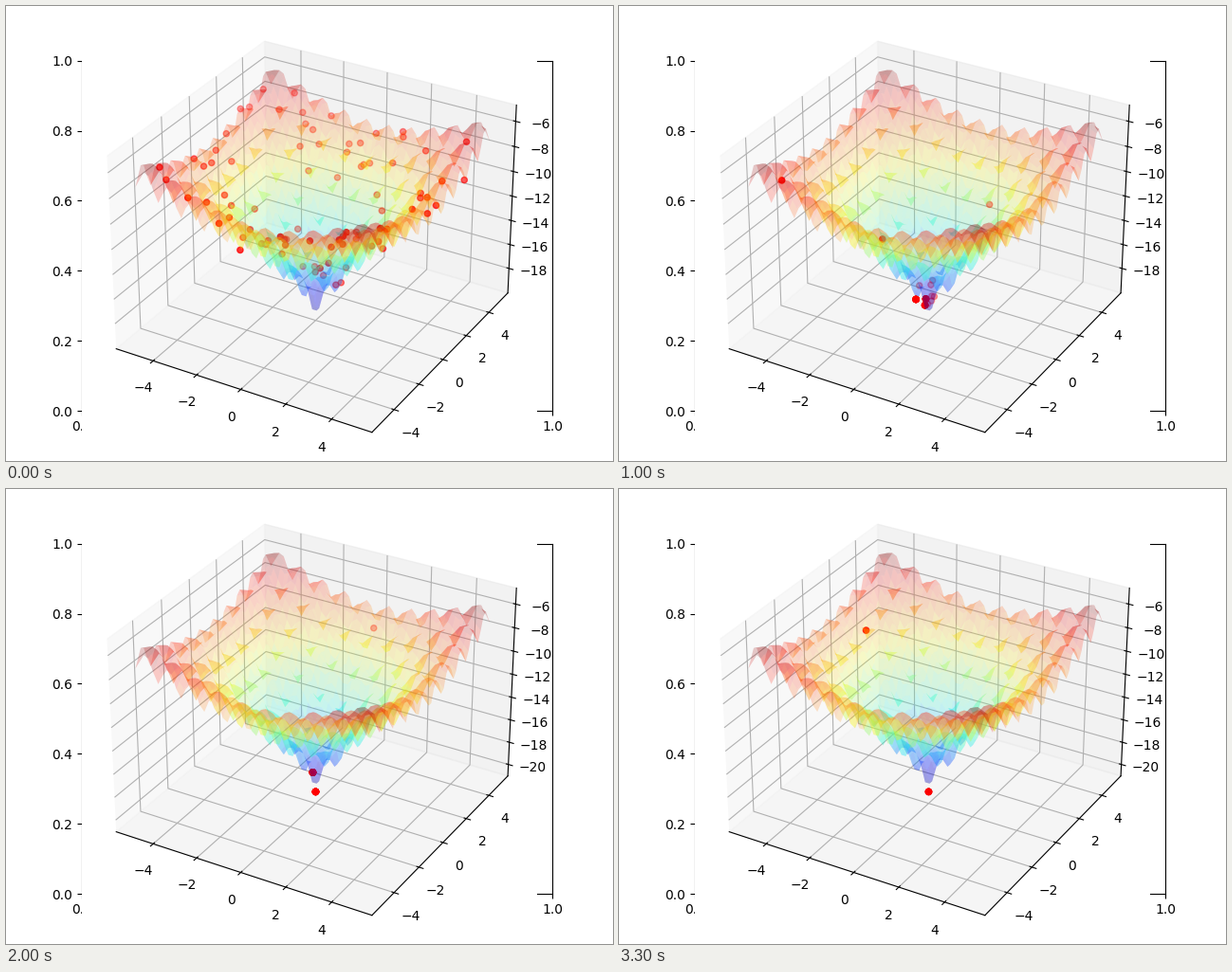
Write a matplotlib script that moves like this. It is 640 by 480 pixels and loops after 3.4 s.

```python
import numpy as np
import matplotlib.pyplot as plt
from matplotlib.animation import FuncAnimation
from mpl_toolkits.mplot3d import Axes3D

FRAMES, STEP = 34, 100
BOUND = 5
SEED = 7

# leading solutions: x, y, first and last generation they live in
LEADERS = [(0, -1, 3, 11), (-0.17, 0, 7, 16), (-0.19, 0.1, 9, 21),
           (0, 0, 17, FRAMES)]
COPIES = 14


def ackley(x, y):
    bowl = -20 * np.exp(-0.2 * np.sqrt(0.5 * (x**2 + y**2)))
    ripple = np.exp(0.5 * (np.cos(2 * np.pi * x) + np.cos(2 * np.pi * y)))
    return bowl - ripple + np.e


def padded(low, high):
    """Data limits with a 5 % margin, and the wider limits of the panes."""
    margin = 0.05 * (high - low)
    low, high = low - margin, high + margin
    pane = (high - low) / 48
    return low, (low - pane, high + pane)


plt.rcParams["font.family"] = "DejaVu Sans"
fig, flat = plt.subplots(figsize=(6.4, 4.8), dpi=100)
ax = Axes3D(fig, rect=[0.125, 0, 0.75, 1])
fig.add_axes(ax)

side = np.linspace(-BOUND, BOUND, 50)
gx, gy = np.meshgrid(side, side)
gz = ackley(gx, gy)
ax.plot_surface(gx, gy, gz, cmap="jet", alpha=0.2)
ax.set_xlim(padded(-BOUND, BOUND)[1])
ax.set_ylim(padded(-BOUND, BOUND)[1])


def population(gen):
    rng = np.random.default_rng([SEED, gen])

    # scattered individuals die out until a single mutant is left
    wild = rng.uniform(-BOUND, BOUND, (1 + int(84 * np.exp(-gen / 2.7)), 2))

    # the fitter half of a cloud that tightens around the centre
    size = int(26 * np.exp(-((gen - 6) / 3.5)**2))
    cloud = rng.normal(0, 1.6 * np.exp(-gen / 8), (3 * size, 2))
    cloud = cloud[ackley(*cloud.T) > gz.min()]
    cloud = cloud[np.argsort(ackley(*cloud.T))][:size]

    lead = [(x, y) for x, y, first, last in LEADERS if first <= gen <= last]
    lead = np.reshape(lead * COPIES, (-1, 2))
    return np.vstack([wild, cloud, lead])


dots = []


def update(gen):
    while dots:
        dots.pop().remove()
    x, y = population(gen).T
    z = ackley(x, y)
    dots.append(ax.scatter(x, y, z, c="red"))

    low, limits = padded(min(gz.min(), z.min()), gz.max())
    ax.set_zlim(limits)
    ax.set_zticks(np.arange(2 * np.ceil(low / 2), -5, 2))
    ax.set_zlim(limits)
    return dots


anim = FuncAnimation(fig, update, frames=FRAMES, interval=STEP,
                     init_func=lambda: update(0), repeat=True, repeat_delay=0)
plt.show()
```
